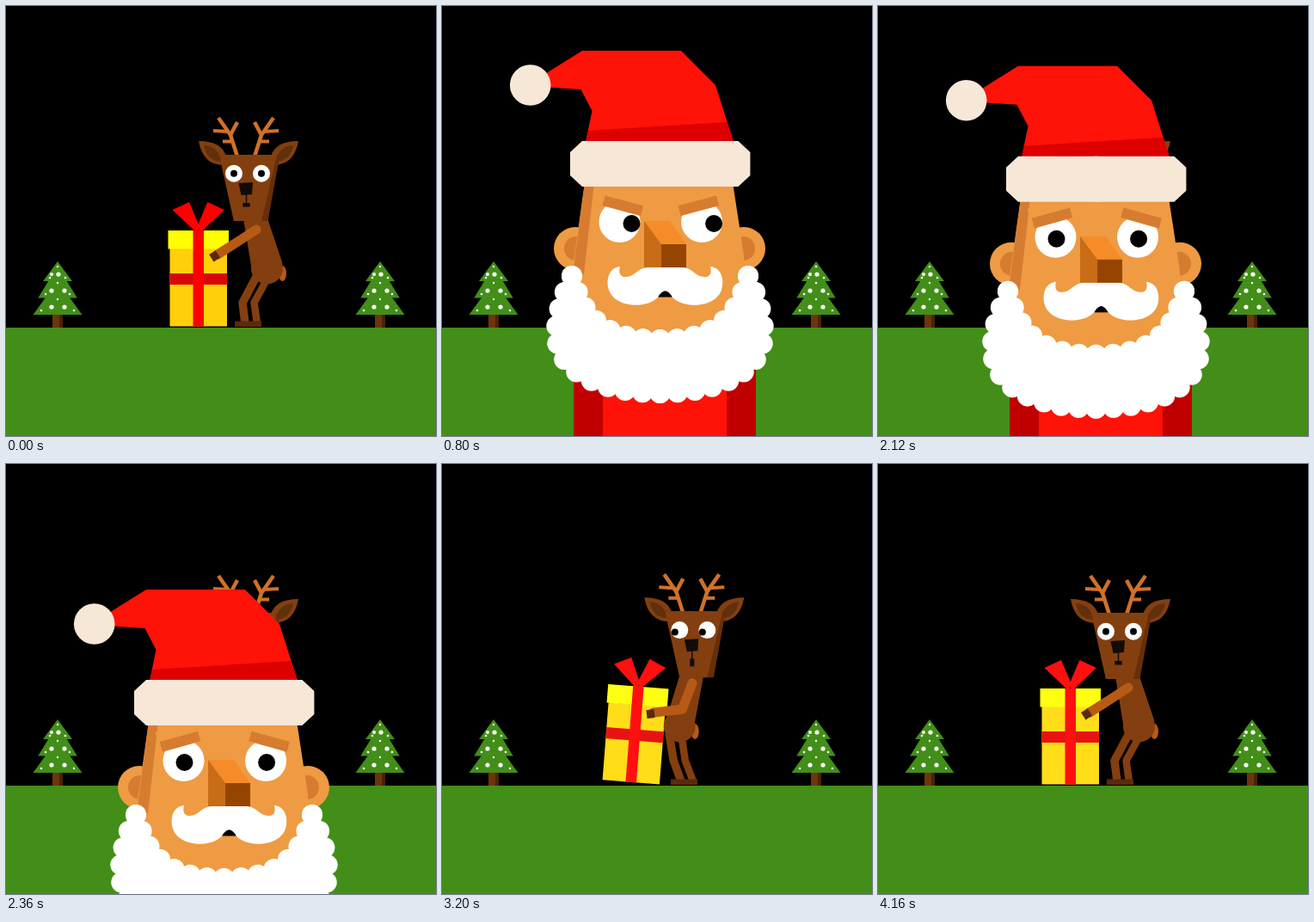
Animation, 500 px wide and 500 px high, one loop 4.56 s. Source, as an HTML page with a canvas:

```html
<!DOCTYPE html>
<html lang="en">
<head>
<meta charset="utf-8">
<title>Santa and the reindeer</title>
<style>
html, body { margin: 0; height: 100%; overflow: hidden; background: #000; }
canvas { display: block; width: 100vw; height: 100vh; }
</style>
</head>
<body>
<canvas id="stage" width="500" height="500"></canvas>
<script>
const LOOP = 4560, STEP = 40;
const ctx = document.getElementById('stage').getContext('2d');

const WHITE = '#fff', BLACK = '#000', GREEN = '#428e19', RED = '#ff1207', CREAM = '#f6e7d7';
const SKIN = '#ee9b43', SKIN_DARK = '#d67c31';
const FUR = '#843f10', FUR_DARK = '#672f09', HOOF = '#5b2a0e', ANTLER = '#d0712a', ARM = '#b75a15';
const NOSE = '#110c08';

// Drawing helpers: points are flat lists x, y, x, y ...
function trace(p) {
  ctx.beginPath();
  for (let i = 0; i < p.length; i += 2) ctx.lineTo(p[i], p[i + 1]);
}
function poly(color, p) {
  trace(p);
  ctx.fillStyle = color;
  ctx.fill();
}
function line(color, width, p, cap = 'butt') {
  trace(p);
  Object.assign(ctx, { strokeStyle: color, lineWidth: width, lineCap: cap, lineJoin: 'round' });
  ctx.stroke();
}
function dot(color, x, y, r, ry = r) {
  ctx.beginPath();
  ctx.ellipse(x, y, r, ry, 0, 0, 7);
  ctx.fillStyle = color;
  ctx.fill();
}
function rect(color, x, y, w, h) {
  ctx.fillStyle = color;
  ctx.fillRect(x, y, w, h);
}
function shape(color, d) {
  ctx.fillStyle = color;
  ctx.fill(new Path2D(d));
}
function group(x, y, degrees, draw) {
  ctx.save();
  ctx.translate(x, y);
  ctx.rotate(degrees * Math.PI / 180);
  draw();
  ctx.restore();
}
// Draws the left half, then its reflection about the vertical line x = axis.
function mirrored(axis, draw) {
  for (const side of [1, -1]) {
    ctx.save();
    ctx.translate(axis, 0);
    ctx.scale(side, 1);
    ctx.translate(-axis, 0);
    draw(side);
    ctx.restore();
  }
}
// Evenly spaced points along a path
function spaced(d, count) {
  const path = document.createElementNS('http://www.w3.org/2000/svg', 'path');
  path.setAttribute('d', d);
  const gap = path.getTotalLength() / count;
  return Array.from({ length: count + 1 }, (_, i) => {
    const { x, y } = path.getPointAtLength(i * gap);
    return [x, y];
  });
}

// Motion helpers
const mix = (a, b, k) => a + (b - a) * k;
const blend = (a, b, k) => a.map((v, i) => mix(v, b[i], k));
const smooth = k => k * k * (3 - 2 * k);
function track(t, keys) {
  let [t0, v0] = keys[0];
  for (const [t1, v1] of keys) {
    if (t < t1) return t <= t0 ? v0 : mix(v0, v1, smooth((t - t0) / (t1 - t0)));
    [t0, v0] = [t1, v1];
  }
  return v0;
}

function drawTree() {
  rect('#6e350d', 54, 358, 12, 16);
  rect('#4c2307', 62, 358, 4, 16);
  for (let tier = 0; tier < 3; tier++) {
    const base = 320 + 19.5 * tier, half = 17 + 5.75 * tier, top = 7 + 3.5 * tier;
    if (tier) poly(GREEN, [60 - top, base - 20, 60 + top, base - 20, 60 + half, base, 60 - half, base]);
    else poly(GREEN, [60, 297, 60 + half, base, 60 - half, base]);
  }
  for (let row = 0; row < 3; row++) {
    const y = 303 + 19 * row;
    dot(WHITE, 60, y, 1.2);
    dot(WHITE, 53, y + 9, row ? 2.6 : 2);
    dot(WHITE, row ? 68 : 61, y + 9, 2.6);
    for (const side of [-1, 1]) dot(WHITE, 60 + side * (9 + 5 * row), y + 13, 1.3);
  }
}

function drawGift(heave, t) {
  const early = t < 640;
  const ribbon = early ? '#ff0000' : '#ff1010';
  group(257 - 4 * heave, 373, 4.3 * heave, () => {
    ctx.translate(-257, -373);
    rect(early ? '#ffcf0c' : '#ffdd19', 190.5, 282, 66.5, 90.5);
    rect(early ? '#ffff00' : '#ffff12', 188.5, 261, 70.5, 21.5);
    rect(early ? '#d8070b' : '#e81212', 190.5, 311, 66.5, 13);
    rect(ribbon, 217.5, 261, 12.5, 111.5);
    mirrored(223.7, () => poly(ribbon, [193.5, 237, 213, 228, 225, 256, 222, 264]));
  });
}

function drawHead(look, heave) {
  mirrored(279, () => {
    line(ANTLER, 4.5, [269, 175, 261, 150, 247, 130]);
    line(ANTLER, 4.5, [261, 150, 269, 135]);
    line(ANTLER, 4, [241, 145, 258, 146]);
    line(ANTLER, 4, [252, 157.5, 264, 157.5]);
  });
  mirrored(282, () => {
    shape(FUR, 'M224 157Q251 157 256 175L253 185Q229 185 224 157Z');
    shape('#61300c', 'M230 162Q247 163 251 181Q234 181 230 162Z');
  });
  poly(FUR_DARK, [248, 173, 318.5, 173, 304.5, 250, 265, 250]);
  poly(FUR, [248, 173, 315, 173, 297, 250, 265, 250]);
  for (const x of [265, 297]) {
    dot(WHITE, x, 194.7, 10);
    dot(BLACK, x - 5.5 * look, 194.7 + 2.5 * look, 4);
  }
  poly(NOSE, [270.5, 206, 287, 205, 286, 219, 273.5, 220]);
  line(NOSE, 1.5, [279.5, 219, 279.5, 231]);
  const mouth = 4.2 - 1.7 * look;
  rect(NOSE, 279.5 - mouth, 229 - look, 2 * mouth, 4.5 + 4.5 * look);
}

function drawReindeer(heave) {
  const look = Math.min(heave, 1);
  const hip = 303.5 - 26.5 * heave;
  const leg = (offset, knee, foot, width) =>
    line(FUR, width, [hip + offset, 314, knee - 5.5 * heave, 345, foot, 369]);
  dot(ARM, hip + 18, 311, 4.5, 9);
  leg(2, 288.5, 292, 8.5);
  leg(-12, 275, 278, 9.5);
  rect(HOOF, 266, 366.5, 31, 6.5);
  poly(FUR, [276, 247, 304, 247, hip + 18, 299, hip, 318, hip - 18, 305]);
  dot(FUR, hip, 305, 18.5);

  const lift = heave + 20 * Math.max(0, heave - 1);
  group(11 * heave, -lift, 0, () => drawHead(look, heave));

  const elbow = [mix(268, 279, heave), mix(275, 285, heave)];
  line(ARM, 11, [291, 260 - 5 * heave, ...elbow, 246, 289], 'round');
  group(243, 290.5, mix(-33, -8, heave), () => rect(HOOF, -5, -5, 9, 10));
}

// Each expression: gaze, then how far the brows move inward and down, and their tilt
const FACES = {
  calm: [0, 0, 0, 0],
  right: [13, 4.3, 6.7, 15],
  left: [-13, 4.3, 6.7, 15],
  worried: [0, -3.5, 3.2, -15.5]
};
function expression(t) {
  const toward = (from, to, start, end) => blend(from, to, track(t, [[start, 0], [end, 1]]));
  const stare = toward(FACES.calm, FACES.right, 640, 800);
  const glance = toward(stare, FACES.left, 1040, 1240);
  return toward(glance, FACES.worried, 1640, 1840);
}

const BEARD_OUTER = spaced('M151 314C136 345 133 365 133 380C133 430 190 450 253.5 450', 11);
const BEARD_INNER = spaced('M151 314C163 350 176 388 253.5 388', 7);

function drawBeard() {
  const edge = [...BEARD_OUTER, [256, 450], [256, 388], ...BEARD_INNER.slice().reverse()];
  mirrored(253.5, () => {
    poly(WHITE, edge.flat());
    for (const [x, y] of [...BEARD_OUTER, ...BEARD_INNER]) dot(WHITE, x, y, 12);
  });
}

function drawHat() {
  poly(RED, [163, 52, 278, 52, 318, 92, 339, 158, 167, 158, 174.5, 122, 161.5, 97, 115, 94, 115, 82]);
  poly('#dd0000', [170, 145, 331.5, 135, 339, 158, 167, 158]);
  dot(CREAM, 102.7, 92, 23.8);
  mirrored(253.7, () => poly(CREAM, [256, 157, 163, 157, 149, 170, 149, 197, 163, 210, 256, 210]));
}

function drawSanta(t) {
  const [gaze, inward, down, tilt] = expression(t);
  rect('#c00000', 153, 420, 212, 180);
  rect(RED, 187, 420, 144, 180);

  mirrored(253, () => {
    dot(SKIN, 155, 282, 25);
    dot(SKIN_DARK, 156, 282, 14);
  });
  poly(SKIN, [166, 205, 338, 205, 351, 290, 351, 390, 152, 390, 152, 305]);
  poly(SKIN_DARK, [166, 205, 177, 205, 165, 312, 152, 312]);

  mirrored(254.3, side => {
    dot(WHITE, 206.5, 251, 24);
    dot(BLACK, 206.5 + side * (1 + gaze), 253, 10);
    group(206 + inward, 225.5 + down, tilt, () => {
      rect(SKIN, -25, -18, 50, 24);
      rect(SKIN_DARK, -23, -6, 46, 12);
    });
  });

  drawHat();
  drawBeard();
  poly(BLACK, [251, 338.5, 251, 328, 268, 328, 268, 338.5]);
  mirrored(259.5, () => shape(WHITE, `M261 304H242C229 304 228 310 219 314C211 317 204 314 207 303
    C195 304 190 317 194 330C200 349 234 354 251 339Q255 331 261 331Z`));
  poly('#f68c28', [235, 250, 265, 250, 284, 277, 255, 277]);
  poly('#c86c17', [235, 250, 255, 277, 255, 304, 235, 304]);
  rect('#964500', 255, 277, 29, 27);
}

// Springs up past the resting place; later dips, hops and drops out of sight.
function santaDrop(t) {
  if (t < 640) {
    const u = (t - 640) / 560;
    return -450 * (2.5 * u ** 3 + 1.5 * u ** 2);
  }
  if (t < 2280) return track(t, [[2080, 0], [2140, 24], [2280, -28]]);
  return -28 + 488 * ((t - 2280) / 160) ** 2;
}

const heaveAt = t => track(t, [[2640, 0], [3000, 1.15], [3160, 1.15], [3360, 0],
  [3520, 0], [3760, 1.15], [3920, 1.15], [4160, 0]]);

function draw(t) {
  const heave = heaveAt(t);
  rect(BLACK, 0, 0, 500, 500);
  rect(GREEN, 0, 374, 500, 126);
  drawTree();
  group(375, 0, 0, drawTree);
  drawGift(heave, t);
  drawReindeer(heave);
  if (t > 80 && t < 2440) group(0, santaDrop(t), 0, () => drawSanta(t));
}

const start = performance.now();
function frame() {
  const t = (performance.now() - start) % LOOP;
  draw(Math.floor(t / STEP) * STEP);
  requestAnimationFrame(frame);
}
frame();
</script>
</body>
</html>
```
